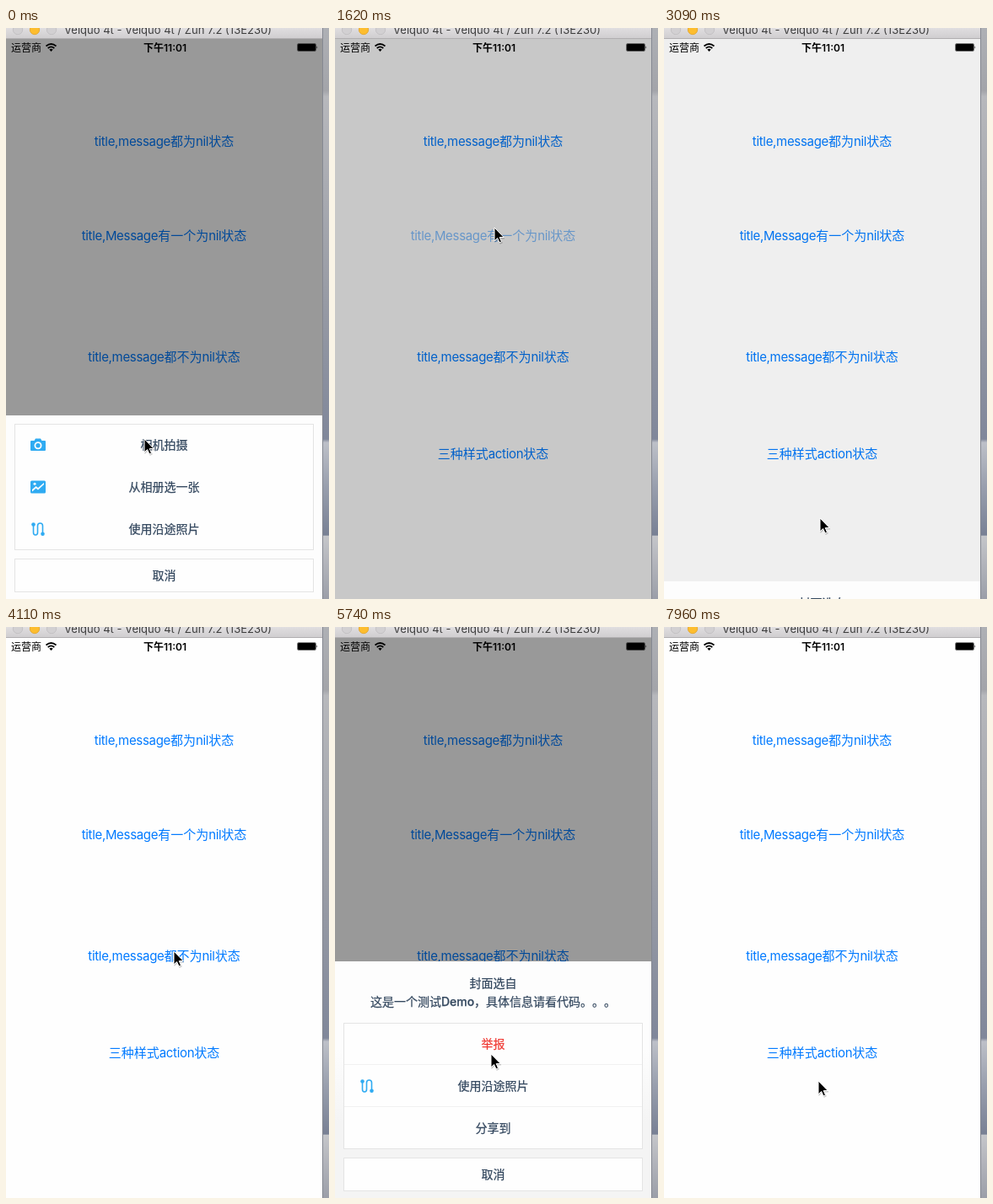
An HTML page that plays this animation: 383x678 px, repeating every 8000 ms.

```html
<!DOCTYPE html>
<html lang="zh-CN">
<head>
<meta charset="utf-8">
<title>Action sheet demo</title>
<style>
  html, body { margin: 0; width: 100%; height: 100%; overflow: hidden; background: #fff; }
  svg { display: block; }
  text {
    font-family: Inter, "Noto Sans CJK SC", "Noto Sans CJK", sans-serif;
    font-feature-settings: "chws" 0, "halt" 0;
    text-spacing-trim: space-all;
  }
  .mid { text-anchor: middle; }
  .link { font-size: 15px; fill: #007aff; }
  .link tspan { letter-spacing: -.32px; }
  .label { font-size: 14px; font-weight: 500; fill: #34485f; stroke: #34485f; stroke-width: .25px; }
  .label.red { fill: #f03a34; stroke: #f03a34; }
  .box { fill: #fefefe; stroke: #e4e4e4; }
  .rule { stroke: #f1f1f1; }
  .press { fill: #d9d9d9; }
  .bar { font-size: 12px; }
</style>
</head>
<body>
<svg width="383" height="678" viewBox="0 0 383 678">
  <defs>
    <linearGradient id="title-bar" x2="0" y2="1">
      <stop stop-color="#e0dee0"/><stop offset="1" stop-color="#d0ced0"/>
    </linearGradient>
    <linearGradient id="wall" x2="0" y2="1">
      <stop stop-color="#aeb0b5"/><stop offset=".11" stop-color="#a3a4a9"/>
      <stop offset=".12" stop-color="#b7b8bc"/><stop offset=".45" stop-color="#9a9da6"/>
      <stop offset=".72" stop-color="#80879a"/><stop offset=".726" stop-color="#bdc0c8"/>
      <stop offset=".8" stop-color="#9aa0ae"/><stop offset=".888" stop-color="#788094"/>
      <stop offset=".89" stop-color="#c4c5c9"/><stop offset="1" stop-color="#9b9ea8"/>
    </linearGradient>
    <linearGradient id="frost" gradientUnits="userSpaceOnUse" x1="0" y1="500" x2="0" y2="590">
      <stop stop-color="#fdfdfd"/><stop offset="1" stop-color="#f4f4f4"/>
    </linearGradient>
    <clipPath id="screen"><path d="M0 13H375V678H0Z"/></clipPath>

    <g id="camera" fill="#2fabf2">
      <path fill-rule="evenodd" d="M-8-5H-4.5L-3-7.500H3L4.500-5H8Q9-5 9-4V6Q9 7 8 7H-8Q-9 7-9 6V-4Q-9-5-8-5ZM0-3.700A4.500 4.500 0 1 0 0 5.300A4.500 4.500 0 1 0 0-3.700Z"/>
      <circle cy=".8" r="2.700"/>
    </g>
    <g id="picture">
      <rect x="-9" y="-7.500" width="18" height="15" rx="1.500" fill="#2fabf2"/>
      <path d="M-7 5.500V3L-2.500-1 0 1 7-5V-3L0 3.500-2.500 1.500Z" fill="#fff"/>
      <circle cx="-4" cy="-3.700" r="1.500" fill="#fff"/>
    </g>
    <g id="route" fill="#2fabf2">
      <path d="M-5.500-5V4Q-5.500 7-3 7T-.5 4V-4Q-.5-7 2.500-7T5.500-4V5" fill="none" stroke="#2fabf2" stroke-width="1.600"/>
      <circle cx="-5.500" cy="-5.500" r="2.300"/><circle cx="5.500" cy="5.700" r="2.300"/>
    </g>
  </defs>

  <rect width="383" height="678" fill="#fefefe"/>
  <rect x="375" width="8" height="678" fill="url(#wall)"/>
  <path d="M375.500 0V678" stroke="#858891"/>

  <g id="links"></g>
  <g clip-path="url(#screen)">
    <rect id="dim" y="13" width="375" height="665"/>
    <g id="sheets"></g>
  </g>

  <rect width="375" height="12" fill="url(#title-bar)"/>
  <path d="M0 12.500H375" stroke="#b0aeb0"/>
  <g stroke-width=".8">
    <circle cx="14" cy="2" r="5.700" fill="#d2d0d2" stroke="#bfbdbf"/>
    <circle cx="34" cy="2" r="5.700" fill="#fdbd2e" stroke="#e0a32a"/>
    <circle cx="54" cy="2" r="5.700" fill="#d2d0d2" stroke="#bfbdbf"/>
  </g>
  <text x="69" y="7" font-size="13" fill="#3e3e3e">Velquo 4t - Velquo 4t / Zun 7.2 (13E230)</text>

  <text class="bar" x="6" y="27.500">运营商</text>
  <g fill="none" stroke="#000" stroke-width="1.700">
    <path d="M47.500 21.500Q53.500 16.500 59.500 21.500M49.700 24Q53.500 20.800 57.300 24"/>
  </g>
  <path d="M51.300 25.500Q53.500 23.800 55.700 25.500L53.500 28Z"/>
  <text class="bar mid" x="188.500" y="27.500" font-weight="600">下午11:01</text>
  <rect x="345.500" y="18.500" width="22" height="9" rx="1.500" fill="none" stroke="#000" stroke-opacity=".5"/>
  <rect x="346" y="19" width="21" height="8" rx="1"/>
  <path d="M368.500 21.300Q370 23 368.500 24.700Z"/>

  <g id="cursor">
    <path d="M0 0V15.800L3.600 12.500 6 17.800 8.500 16.700 6.200 11.500H11.200Z" fill="#000" opacity=".18" transform="translate(.8 1.500)" stroke="#000"/>
    <path d="M0 0V15.800L3.600 12.500 6 17.800 8.500 16.700 6.200 11.500H11.200Z" stroke="#fff"/>
  </g>
</svg>
<script>
const $ = id => document.getElementById(id);
const LOOP = 8000, TICK = 147.4, BOTTOM = 678;

const links = [
  ['title,message都为nil状态', 140],
  ['title,Message有一个为nil状态', 252],
  ['title,message都不为nil状态', 396],
  ['三种样式action状态', 511]
];
const sheets = [
  { top: 460, heads: [], fill: '#fdfdfd', press: [0, 1, 11],
    rows: [['相机拍摄', 'camera'], ['从相册选一张', 'picture'], ['使用沿途照片', 'route']] },
  { top: 419, heads: ['封面选自'], fill: 'url(#frost)', press: [2, 18, 30], ruled: true,
    rows: [['从相册选一张', 'picture'], ['拉黑TA', '', 'red'], ['分享到']] },
  { top: 397, heads: ['封面选自', '这是一个测试Demo，具体信息请看代码。。。'], fill: 'url(#frost)', ruled: true,
    rows: [['举报', '', 'red'], ['使用沿途照片', 'route'], ['分享到']] }
];

// Times below are in ticks: [tick, sheet, opening]
const events = [[-9, 0, true], [4, 0, false], [11, 1, true], [20, 1, false], [30, 2, true], [51, 2, false]];
const opening = { dim: [.21, .37, .4], shift: [1, .192, 0], link: [.48, .8, 1] };
const closing = { dim: [.27, .06, 0], shift: [.35, .92, 1], link: [1] };

// Pointer path: [tick, x, y]
const path = [
  [0, 164, 488], [4, 164, 488], [9, 189, 237], [12, 189, 237], [16, 184, 591],
  [18, 184, 594], [20, 184, 594], [27, 199, 375], [28, 199, 385], [31, 199, 385],
  [36, 187, 510], [38, 187, 510], [40, 182, 504], [41, 182, 504], [46, 176, 631],
  [47, 176, 631], [49, 176, 641], [51, 176, 641], [54, 183, 539]
];

const text = (s, y, cls) => `<text class="mid ${cls}" x="187.5" y="${y}">${s}</text>`;
const tightLatin = s => s.replace(/[a-z,]+/gi, '<tspan>$&</tspan>');

function sheetMarkup({ top, heads, rows, fill, press, ruled }) {
  let out = `<g><rect y="${top}" width="375" height="${BOTTOM - top}" fill="${fill}"/>`;
  heads.forEach((s, i) => out += text(s, top + 31 + i * 22, 'label'));
  out += '<rect class="box" x="10.5" y="470.5" width="354" height="149"/>';
  out += '<rect class="box" x="10.5" y="630.5" width="354" height="39"/>';
  if (press) out += `<rect class="press" x="11" y="${471 + press[0] * 50}" width="353" height="49"/>`;
  if (ruled) out += '<path class="rule" d="M11 519.5H364M11 569.5H364"/>';
  rows.forEach(([s, icon, color = ''], i) => {
    const y = 495 + i * 50;
    if (icon) out += `<use href="#${icon}" x="38" y="${y}"/>`;
    out += text(s, y + 5, 'label ' + color);
  });
  return out + text('取消', 655, 'label') + '</g>';
}

$('links').innerHTML = links.map(([s, y]) => text(tightLatin(s), y, 'link')).join('');
$('sheets').innerHTML = sheets.map(sheetMarkup).join('');
const linkEls = [...$('links').children];
const sheetEls = [...$('sheets').children];

function pointerAt(k) {
  const n = path.findIndex(p => p[0] > k);
  if (n < 0) return path[path.length - 1].slice(1);
  const [a, ax, ay] = path[n - 1], [b, bx, by] = path[n];
  const u = (k - a) / (b - a), e = u * u * (3 - 2 * u);
  return [ax + (bx - ax) * e, ay + (by - ay) * e];
}

function draw(k) {
  const [start, active, isOpen] = events.filter(e => e[0] <= k).pop();
  const pose = isOpen ? opening : closing;
  const at = list => list[Math.min(k - start, list.length - 1)];

  $('dim').setAttribute('opacity', at(pose.dim));
  linkEls.forEach((el, i) => el.setAttribute('opacity', i === active ? at(pose.link) : 1));
  sheetEls.forEach((el, i) => {
    const { top, press } = sheets[i];
    const shift = i === active ? at(pose.shift) : 1;
    el.setAttribute('visibility', shift < 1 ? 'visible' : 'hidden');
    el.setAttribute('transform', `translate(0 ${Math.round(shift * (BOTTOM - top))})`);
    if (press) el.querySelector('.press').setAttribute('opacity', +(k >= press[1] && k < press[2]));
  });
  $('cursor').setAttribute('transform', `translate(${pointerAt(k).map(Math.round).join(' ')})`);
}

const begin = performance.now();
function frame() {
  const t = (performance.now() - begin) % LOOP;
  draw(Math.floor((t + 20) / TICK));
  requestAnimationFrame(frame);
}
frame();
</script>
</body>
</html>
```
